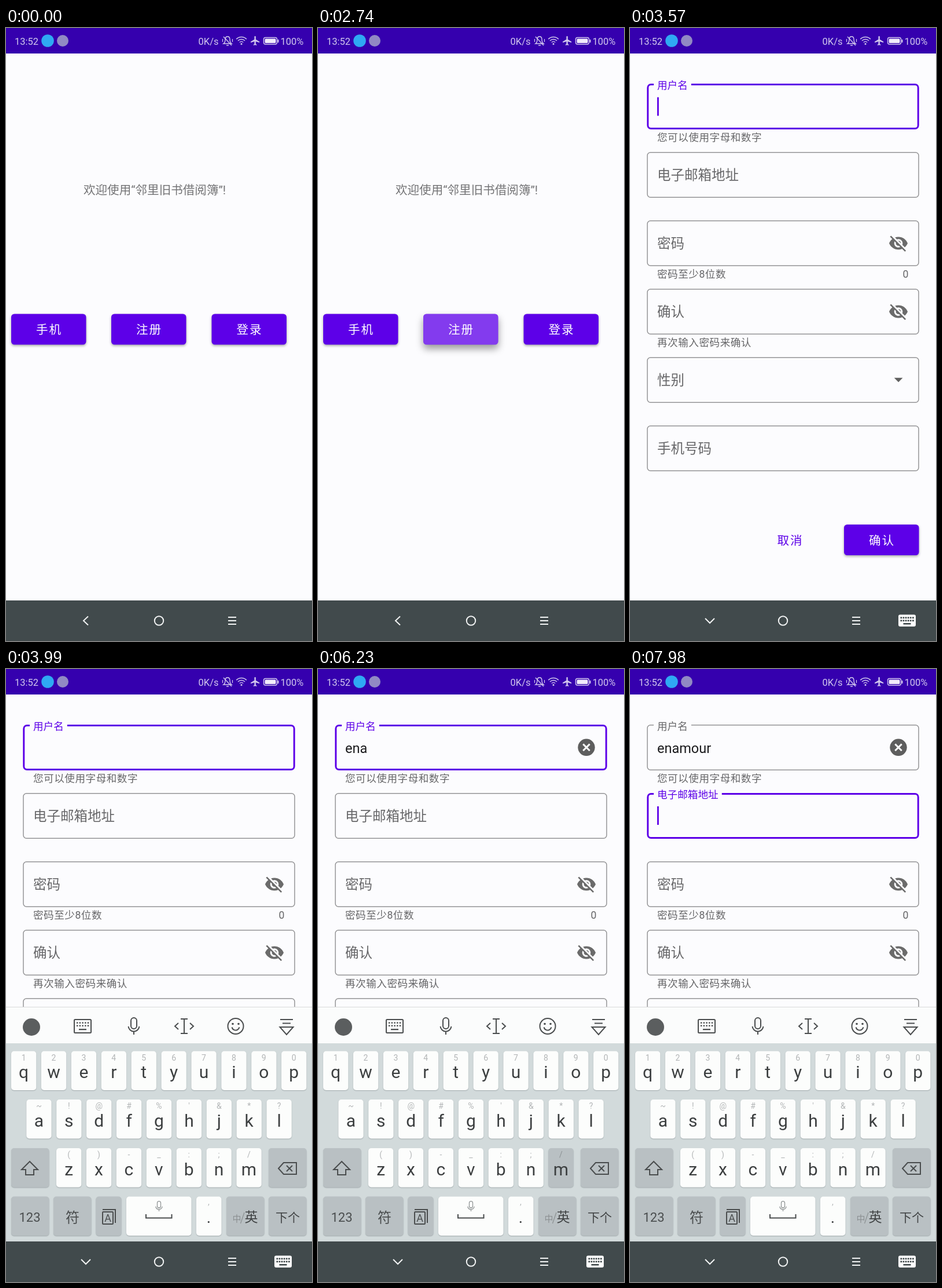
Recreate the animation shown at these times as an HTML page with a canvas. Size 529 by 1058 pixels, loop 8000 ms.

```html
<!DOCTYPE html>
<html lang="zh-CN">
<head>
<meta charset="utf-8">
<title>注册</title>
<style>
  html, body { margin: 0; width: 100%; height: 100%; overflow: hidden; background: #fcfcfe; }
  canvas { display: block; width: 529px; height: 1058px; }
</style>
</head>
<body>
<canvas id="stage" width="529" height="1058"></canvas>
<script>
const ctx = document.getElementById('stage').getContext('2d');
const FONT = 'Roboto, "Noto Sans CJK SC", "Noto Sans CJK", sans-serif';
const PURPLE = '#5d00e8', PAPER = '#fcfcfe', GREY = '#666668', INK = '#4a4d4e';
const LOOP = 8000;

// Timeline in ms
const PRESS = 2740, RELEASE = 3070, PAGE = 3270, KEYBOARD = 3580, NEXT_FIELD = 7980;
const WORD = 'enamour';
const KEY_DOWN = [5070, 5480, 5730, 6230, 6480, 6730, 6980];
const HOLD = 80;
const CURSOR_FLIPS = [3820, 4320, 4820, 5150, 5900, 6310, 7480, 7980];

const EYE_OFF = new Path2D('M12 7c2.76 0 5 2.24 5 5 0 .65-.13 1.26-.36 1.83l2.92 2.92c1.51-1.26 2.7-2.89 3.43-4.75-1.73-4.39-6-7.5-11-7.5-1.4 0-2.74.25-3.98.7l2.16 2.16C10.74 7.13 11.35 7 12 7zM2 4.27l2.28 2.28.46.46C3.08 8.3 1.78 10.02 1 12c1.73 4.39 6 7.5 11 7.5 1.55 0 3.03-.3 4.38-.84l.42.42L19.73 22 21 20.73 3.27 3 2 4.27zM7.53 9.8l1.55 1.55c-.05.21-.08.43-.08.65 0 1.66 1.34 3 3 3 .22 0 .44-.03.65-.08l1.55 1.55c-.67.33-1.41.53-2.2.53-2.76 0-5-2.24-5-5 0-.79.2-1.53.53-2.2zm4.31-.78l3.15 3.15.02-.16c0-1.66-1.34-3-3-3l-.17.01z');
const PLANE = new Path2D('M21 16v-2l-8-5V3.5C13 2.7 12.3 2 11.5 2S10 2.7 10 3.5V9l-8 5v2l8-2.5V19l-2 1.5V22l3.5-1 3.5 1v-1.5L13 19v-5.5z');

const progress = (t, start, length) => Math.min(1, Math.max(0, (t - start) / length));
const easeOut = p => 1 - (1 - p) ** 3;

function text(str, x, y, size, color, align = 'left', spacing = 0) {
  ctx.font = `${size}px ${FONT}`;
  ctx.letterSpacing = spacing + 'px';
  ctx.textAlign = align;
  ctx.fillStyle = color;
  ctx.fillText(str, x, y);
}
function rect(x, y, w, h, color) {
  ctx.fillStyle = color;
  ctx.fillRect(x, y, w, h);
}
function round(x, y, w, h, r) {
  ctx.beginPath();
  ctx.roundRect(x, y, w, h, r);
}
function fill(color) { ctx.fillStyle = color; ctx.fill(); }
function stroke(color, width) { ctx.strokeStyle = color; ctx.lineWidth = width; ctx.stroke(); }
function disc(x, y, r, color) {
  ctx.beginPath();
  ctx.arc(x, y, r, 0, 7);
  fill(color);
}
function ring(x, y, r, color, width, from = 0, to = 2 * Math.PI) {
  ctx.beginPath();
  ctx.arc(x, y, r, from, to);
  stroke(color, width);
}
function line(color, width, ...points) {
  ctx.beginPath();
  for (let i = 0; i < points.length; i += 2) ctx.lineTo(points[i], points[i + 1]);
  stroke(color, width);
}
function icon(path, x, y, size, color) {
  ctx.save();
  ctx.translate(x - size / 2, y - size / 2);
  ctx.scale(size / 24, size / 24);
  ctx.fillStyle = color;
  ctx.fill(path);
  ctx.restore();
}
function shadow(color, blur, dy) {
  ctx.shadowColor = color;
  ctx.shadowBlur = blur;
  ctx.shadowOffsetY = dy;
}

function button(x, y, label, pressed = 0) {
  ctx.save();
  shadow(`rgba(0,0,0,${0.34 + 0.06 * pressed})`, 4 + 9 * pressed, 2 + 5 * pressed);
  round(x, y, 129.5, 53, 5.5);
  fill(PURPLE);
  ctx.restore();
  if (pressed) fill(`rgba(255,255,255,${0.23 * pressed})`);
  text(label, x + 65.5, y + 34.5, 20.57, '#fff', 'center', 1.84);
}

function statusBar() {
  const light = '#d3c9ee';
  rect(0, 0, 529, 44, '#3500ae');
  text('13:52', 15, 28.5, 16.5, light);
  disc(72, 22, 10.8, '#2fa9f3');
  disc(98, 22, 10, '#9189c4');
  text('0K/s', 332.5, 28.5, 16.5, light);
  // Muted bell
  ctx.beginPath();
  ctx.moveTo(376, 27);
  ctx.quadraticCurveTo(379, 25, 379, 20);
  ctx.bezierCurveTo(379, 13, 387, 13, 387, 20);
  ctx.quadraticCurveTo(387, 25, 390, 27);
  ctx.closePath();
  stroke(light, 1.4);
  line(light, 1.4, 376, 15, 390, 30);
  line(light, 1.4, 381, 30, 385, 30);
  line(light, 1.2, 374.5, 19, 374.5, 24);
  line(light, 1.2, 391.5, 19, 391.5, 24);
  // Wifi
  for (const r of [4.5, 8.5, 12.5]) ring(407, 28, r, light, 1.5, -2.35, -0.79);
  disc(407, 27.5, 1.5, light);
  icon(PLANE, 431, 22, 19, light);
  // Battery
  round(445.5, 16.5, 23, 11.5, 3);
  stroke(light, 1.4);
  round(447.5, 18.5, 19, 7.5, 1.5);
  fill('#f1ecfb');
  rect(469.5, 20, 2, 5, light);
  text('100%', 474.5, 28.5, 16.5, light);
}

function navBar(onForm) {
  const light = '#f0f2f2';
  rect(0, 988, 529, 70, '#414a4c');
  if (onForm) line(light, 2, 130, 1019, 138, 1027, 146, 1019);
  else line(light, 2, 142, 1015.5, 134, 1023, 142, 1030.5);
  ring(264.5, 1023, 7.7, light, 2);
  for (const y of [1017, 1023, 1029]) line(light, 2, 384, y, 398, y);
  if (!onForm) return;
  round(464, 1012.5, 30, 20.5, 3);
  fill('#fff');
  for (let row = 0; row < 2; row++)
    for (let col = 0; col < 6; col++) rect(467.5 + col * 4.1, 1016.5 + row * 5, 2.7, 2.7, '#3d4648');
  rect(472.5, 1027, 13, 2.5, '#3d4648');
}

function homePage(t) {
  const pressed = t < PRESS ? 0 : 1 - progress(t, RELEASE, 160);
  text('欢迎使用“邻里旧书借阅簿”!', 134, 287, 20.57, '#747476');
  button(9, 493.5, '手机');
  button(182, 493.5, '注册', pressed);
  button(355.5, 493.5, '登录');
}

function field(y, label, focused, floating) {
  const color = focused ? PURPLE : '#949496';
  const inset = focused ? 1.5 : 0.7;
  round(29.3 + inset, y + inset, 470.4 - 2 * inset, 79 - 2 * inset, 5.5);
  stroke(color, focused ? 3 : 1.5);
  if (!floating) return text(label, 47, y + 48, 23.5, GREY);
  rect(41, y - 1, label.length * 17.63 + 12, 5, PAPER);
  text(label, 47, y + 8.7, 17.63, focused ? PURPLE : GREY);
}

function helper(str, y) { text(str, 47, y, 17.63, GREY, 'left', 0.5); }

function formPage(t) {
  const onEmail = t >= NEXT_FIELD;
  const typed = WORD.slice(0, KEY_DOWN.filter(down => t >= down + HOLD).length);

  field(96, '用户名', !onEmail, true);
  helper('您可以使用字母和数字', 194.5);
  field(214, '电子邮箱地址', onEmail, onEmail);
  field(332, '密码');
  helper('密码至少8位数', 430.5);
  text('0', 481.5, 430.5, 17.63, GREY, 'right');
  field(450, '确认');
  helper('再次输入密码来确认', 548.5);
  field(568, '性别');
  field(686, '手机号码');

  for (const y of [371.5, 489.5]) icon(EYE_OFF, 464, y, 35, '#6b6b6b');
  ctx.beginPath();
  ctx.moveTo(456.7, 603.8);
  ctx.lineTo(471.5, 603.8);
  ctx.lineTo(464.1, 611.2);
  fill('#606060');

  text(typed, 47, 144.8, 23.5, '#1c1c1e');
  const typedWidth = ctx.measureText(typed).width;
  if (typed) {
    disc(464, 135.3, 14.7, '#5e5e5e');
    line('#fff', 2.9, 458.3, 129.6, 469.7, 141);
    line('#fff', 2.9, 469.7, 129.6, 458.3, 141);
  }
  if (CURSOR_FLIPS.filter(flip => t >= flip).length % 2 === 0)
    rect(47 + (onEmail ? 0 : typedWidth), onEmail ? 237 : 119.5, 2.8, 32, PURPLE);

  text('取消', 277, 891.5, 20.57, PURPLE, 'center', 1.84);
  button(370, 857, '确认');
}

function key(x, y, w, dark) {
  ctx.save();
  shadow('rgba(90,100,105,.4)', 1.5, 1);
  round(x, y, w, 67.5, 5);
  fill(dark ? '#b9c0c3' : '#fcfdfc');
  ctx.restore();
}

function mic(x, y, s, color, width) {
  round(x - 5 * s, y - 14 * s, 10 * s, 19 * s, 5 * s);
  stroke(color, width);
  ring(x, y, 9.5 * s, color, width, 0.1, Math.PI - 0.1);
  line(color, width, x, y + 9.5 * s, x, y + 15 * s);
}

function toolbar() {
  rect(0, 583, 529, 63, '#fbfcfc');
  rect(0, 583, 529, 1, '#d9dadb');
  disc(44, 618, 15, '#5b5e5f');
  round(118, 605, 29, 23, 1.5);
  stroke(INK, 2);
  for (let row = 0; row < 2; row++)
    for (let col = 0; col < 5; col++) rect(122 + col * 4.7, 609.5 + row * 5, 2.4, 2.4, INK);
  rect(126, 621, 13, 2.2, INK);
  mic(221, 616, 1, INK, 2);
  line(INK, 2, 298, 611, 292, 616.5, 298, 622);
  line(INK, 2, 318, 611, 324, 616.5, 318, 622);
  line(INK, 2, 308, 604, 308, 629);
  for (const y of [604, 629]) line(INK, 2, 302, y, 314, y);
  ring(397, 616.5, 13.5, INK, 2);
  disc(392, 612.5, 1.8, INK);
  disc(402, 612.5, 1.8, INK);
  ring(397, 617, 6.5, INK, 2, 0.2, Math.PI - 0.2);
  line(INK, 2, 474, 605, 496, 605);
  line(INK, 2, 478, 611.5, 492, 611.5);
  ctx.beginPath();
  ctx.moveTo(473.5, 618);
  ctx.lineTo(496.5, 618);
  ctx.lineTo(485, 631);
  ctx.closePath();
  stroke(INK, 2);
}

function keyboard(t) {
  const held = WORD[KEY_DOWN.findIndex(down => t >= down && t < down + HOLD)];
  const rows = [
    [9, 659.5, 'qwertyuiop', '1234567890'],
    [35.3, 743, 'asdfghjkl', "~!@#%'&*?"],
    [87, 827, 'zxcvbnm', '()-_:;/']
  ];
  rect(0, 583, 529, 405, '#d2dadb');
  toolbar();
  for (const [left, top, letters, hints] of rows)
    [...letters].forEach((letter, i) => {
      const x = left + i * 51.9;
      key(x, top, 43.3, letter === held);
      text(hints[i], x + 21.6, top + 16, 14, letter === held ? '#8c9294' : '#b2b5b6', 'center');
      text(letter, x + 21.6, top + 46.5, 30, '#3c3f40', 'center');
    });

  // Shift and backspace
  key(9, 827, 65.5, true);
  line(INK, 2, 41, 850, 27, 864, 34, 864, 34, 873, 48, 873, 48, 864, 55, 864, 41, 850, 40, 851);
  key(454, 827, 65.5, true);
  line(INK, 2, 471, 862, 480, 852, 502, 852, 502, 872, 480, 872, 471, 862, 472, 861);
  line(INK, 2, 485, 857, 495, 867);
  line(INK, 2, 495, 857, 485, 867);

  // Bottom row
  for (const [x, w, dark] of [[9, 65.5, 1], [82, 65.5, 1], [155.5, 44, 1], [208, 112.5, 0], [329, 43.5, 0], [381, 65.5, 1], [454, 65.5, 1]])
    key(x, 910.5, w, dark);
  text('123', 41, 954, 22, INK, 'center');
  text('符', 115, 954.5, 24, INK, 'center');
  line(INK, 2, 167, 933, 189, 933, 189, 956);
  round(167, 937, 18, 21, 1);
  stroke(INK, 2);
  text('A', 176, 954, 18, INK, 'center');
  mic(264.5, 927, 0.6, '#929697', 1.3);
  line(INK, 2, 242, 941, 242, 947.5, 286.5, 947.5, 286.5, 941);
  text(',', 350.5, 925, 14, '#b2b5b6', 'center');
  text('.', 350.5, 956, 28, '#3c3f40', 'center');
  text('中', 399, 954, 15, '#8b9092', 'center');
  line('#8b9092', 1.2, 405.5, 957, 412, 938);
  text('英', 424, 954, 23, '#404344', 'center');
  text('下个', 487, 953.5, 21, '#404344', 'center');
}

function draw(t) {
  rect(0, 0, 529, 1058, PAPER);
  const enter = progress(t, PAGE, 220);
  if (enter < 1) homePage(t);
  if (enter > 0) {
    ctx.save();
    ctx.globalAlpha = enter;
    ctx.translate(0, 40 * (1 - easeOut(enter)));
    rect(0, 44, 529, 944, PAPER);
    formPage(t);
    ctx.restore();
  }
  if (t >= KEYBOARD) {
    ctx.save();
    ctx.translate(0, 405 * (1 - easeOut(progress(t, KEYBOARD, 260))));
    keyboard(t);
    ctx.restore();
  }
  statusBar();
  navBar(enter > 0.5);
}

const start = performance.now();
function tick() {
  draw((performance.now() - start) % LOOP);
  requestAnimationFrame(tick);
}
tick();
</script>
</body>
</html>
```
